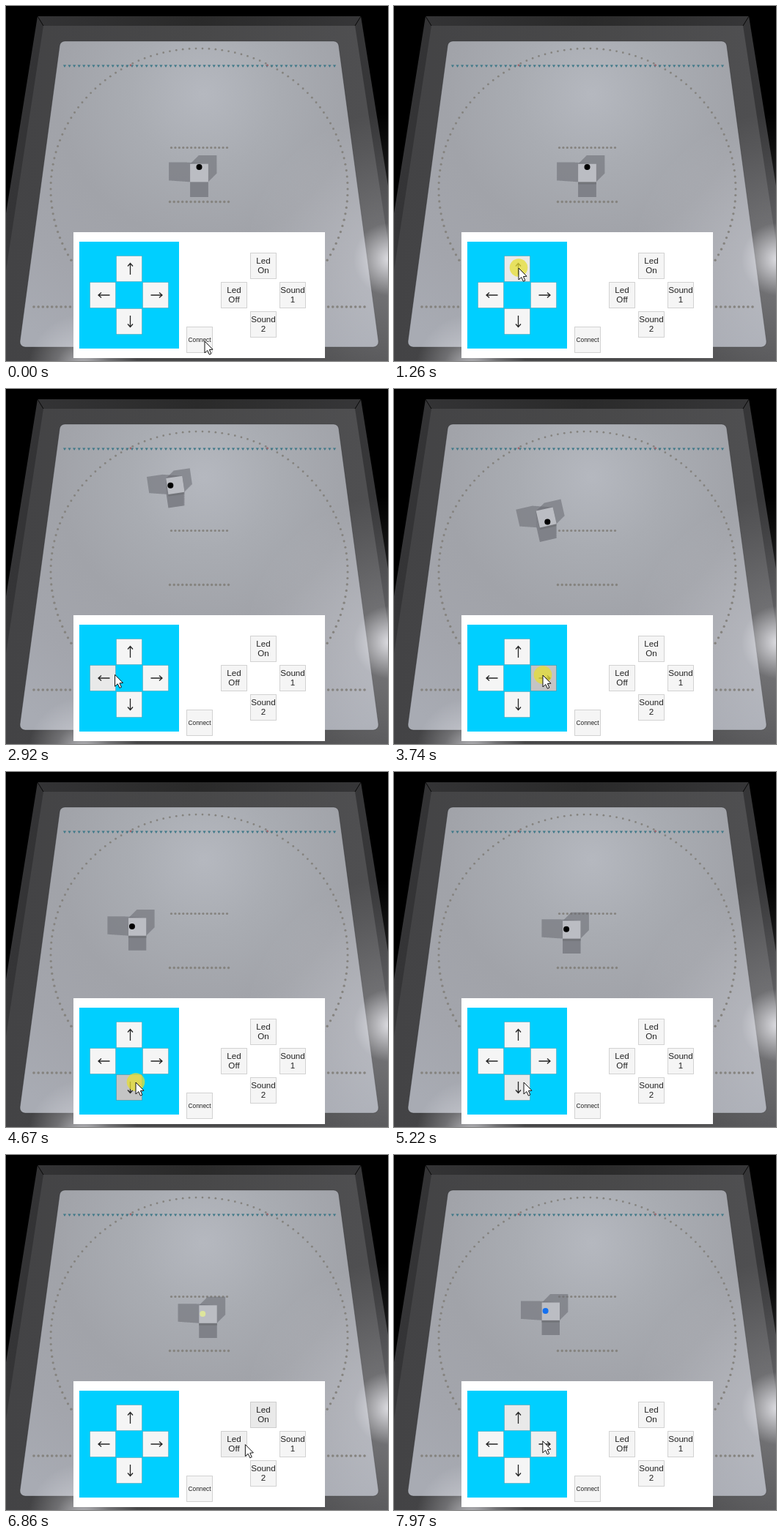
Animation, 521 px wide and 485 px high, one loop 8 s. Source, as an HTML page with a canvas:

```html
<!DOCTYPE html>
<html lang="en">
<head>
<meta charset="utf-8">
<title>Robot remote</title>
<style>
html, body { margin: 0; width: 100%; height: 100%; overflow: hidden; background: #000; }
canvas { display: block; }
</style>
</head>
<body>
<canvas id="stage" width="521" height="485"></canvas>
<script>
const ctx = document.getElementById('stage').getContext('2d');
const LOOP = 8000, SIDE = 35, DOT = '#85837f';

// centre and label; arrow buttons carry quarter turns instead
const buttons = { connect: { x: 264, y: 456, label: ['Connect'] } };
function addCross(cx, cy, pitch, items) {
  items.forEach(([name, content], i) => {
    const a = i * Math.PI / 2;
    buttons[name] = {
      x: cx + Math.round(pitch * Math.sin(a)), y: cy - Math.round(pitch * Math.cos(a)),
      label: content, turns: i
    };
  });
}
addCross(168, 395, 36, [['up'], ['right'], ['down'], ['left']]);
addCross(351, 395, 40, [['ledOn', ['Led', 'On']], ['sound1', ['Sound', '1']],
  ['sound2', ['Sound', '2']], ['ledOff', ['Led', 'Off']]]);

// each click: time, button, pointer offset from the button's centre
const clicks = [
  [0, 'connect', 7, 2], [1250, 'up', 2, -1], [2070, 'left', -4, -5], [3640, 'right', -1, -4],
  [4590, 'down', 9, -7], [6190, 'ledOn', 12, 0], [6990, 'ledOff', 15, 1], [7380, 'up', 2, -1],
  [8050, 'right', -1, -4]
].map(([t, name, dx, dy]) => ({ t, name, x: buttons[name].x + dx, y: buttons[name].y + dy }));

const lerp = (a, b, p) => a + (b - a) * p;
const span = (t, a, b) => Math.min(1, Math.max(0, (t - a) / (b - a)));
const easeOut = p => 1 - (1 - p) ** 3;

function poly(points, fill, stroke) {
  ctx.beginPath();
  points.forEach(([x, y]) => ctx.lineTo(x, y));
  ctx.closePath();
  ctx.fillStyle = fill;
  ctx.fill();
  if (stroke) { ctx.strokeStyle = stroke; ctx.stroke(); }
}

function dot(x, y, r, fill) {
  ctx.beginPath();
  ctx.arc(x, y, r, 0, 7);
  ctx.fillStyle = fill;
  ctx.fill();
}

function withStops(g, colors) {
  colors.forEach((c, i) => g.addColorStop(i / (colors.length - 1), c));
  return g;
}
const linear = (x, y, ...colors) => withStops(ctx.createLinearGradient(0, 0, x, y), colors);
const radial = (x, y, r, ...colors) => withStops(ctx.createRadialGradient(x, y, 0, x, y, r), colors);

function glow(x, y, r, ...alphas) {
  ctx.fillStyle = radial(x, y, r, ...alphas.map(a => `rgba(240,240,245,${a})`));
  ctx.fillRect(x - r, y - r, 2 * r, 2 * r);
}

function dotRow(x0, x1, y, n, r) {
  for (let i = 0; i < n; i++) dot(lerp(x0, x1, i / (n - 1)), y, r, DOT);
}

// all side edges run towards one vanishing point
function slab(half, top, bottom) {
  const cx = 263.5, far = half * (bottom + 1366) / (top + 1366);
  return [[cx - half, top], [cx + half, top], [cx + far, bottom], [cx - far, bottom]];
}

function drawMat() {
  const corners = slab(189.5, 48, 466);
  ctx.beginPath();
  ctx.moveTo(263, 48);
  for (let i = 1; i <= 4; i++) ctx.arcTo(...corners[i % 4], ...(i < 4 ? corners[(i + 1) % 4] : [263, 48]), 7);
  ctx.closePath();
  ctx.fillStyle = radial(270, 120, 400, '#b5b8bf', '#a9acb2', '#a1a3a9', '#a3a5ac', '#a8abb3');
  ctx.fill();
  ctx.strokeStyle = 'rgba(30,30,32,.35)';
  ctx.stroke();
}

function drawArena() {
  ctx.fillStyle = '#000';
  ctx.fillRect(0, 0, 521, 485);
  ctx.lineWidth = 1;
  const rim = slab(220.5, 14, 485), floor = slab(212.5, 27, 485);
  poly(rim, linear(521, 0, '#353537', '#2a2a2a', '#38383a'));
  poly(floor, linear(521, 0, '#434345', '#484849', '#505052'));
  ctx.strokeStyle = '#090909';
  ctx.beginPath();
  for (let i = 0; i < 2; i++) {
    ctx.moveTo(...rim[i]);
    ctx.lineTo(...floor[i]);
  }
  ctx.stroke();
  drawMat();
  glow(524, 346, 200, .9, .2, .13, .06, 0);
  glow(105, 496, 75, .7, .25, 0);

  const n = 142;
  for (let i = 0; i < n; i++) {
    const a = (i + .5) / n * Math.PI * 2, y = 250 - 192 * Math.cos(a);
    dot(263.5 + 202.5 * Math.sin(a), y, 1.3 + y / 900, DOT);
  }
  for (let i = 0; i < 57; i++) {
    const x = lerp(80, 448, i / 56);
    poly([[x - 2.1, 80.5], [x + 2.1, 80.5], [x, 84]], '#3f7888');
  }
  dot(170, 81, 1.4, '#a0656c');
  dot(356.5, 81, 1.4, '#a0656c');
  dotRow(225.5, 301.5, 193.5, 15, 1.6);
  dotRow(223.5, 303.5, 267.5, 15, 1.7);
  dotRow(38, 489, 411, 74, 1.8);
}

// x, y and heading in radians, counterclockwise from up
function pose(t) {
  const side = Math.PI / 2, far = 194 * Math.PI / 180;
  if (t < 2100) return [263.5, lerp(228, 158.5, span(t, 1270, 2090)), 0];
  if (t < 3730) {
    const p = span(t, 2100, 3720), a = far * p;
    return [235 + 28.5 * Math.cos(a), 158.5 - 28.5 * Math.sin(a) + 8 * p ** 3, a];
  }
  if (t < 4670) {
    const a = lerp(far, side, span(t, 3730, 4670));
    return [179 - 29.5 * Math.cos(a), 182 + 29.5 * Math.sin(a), a];
  }
  const p = span(t, 4670, 5510) - .65 * span(t, 7430, 7980);
  return [lerp(179, 275.5, p), lerp(211.5, 217.5, p), side];
}

function drawRobot(t) {
  const [x, y, a] = pose(t), cos = Math.cos(a), sin = Math.sin(a);
  const s = 1 + (y - 228) * .001, h = 12.4 * s;
  const corners = [[-h, -h], [h, -h], [h, h], [-h, h]].map(([u, v]) => [x + u * cos + v * sin, y - u * sin + v * cos]);

  // square dragged along a vector
  const sweep = (dx, dy, fill) => {
    ctx.beginPath();
    for (let i = 0; i <= 30; i++) {
      corners.forEach(([u, v], k) => ctx[k ? 'lineTo' : 'moveTo'](u + dx * s * i / 30, v + dy * s * i / 30));
      ctx.closePath();
    }
    ctx.fillStyle = fill;
    ctx.fill();
  };
  sweep(-29, -2, 'rgba(105,107,115,.56)');
  sweep(11.5, -11.5, 'rgba(105,107,115,.56)');
  sweep(0, 20.5, '#7f8188');
  if (t > 700) sweep(0, 3, '#73757a');
  poly(corners, '#bbbdc3');
  const led = t > 7060 ? '#1470f0' : t > 6260 ? '#dde59c' : '#000';
  dot(x - sin * 7.3 * s, y - cos * 7.3 * s - .6, 4, led);
}

function pointerAt(t) {
  const i = clicks.findIndex(c => c.t > t), from = clicks[i - 1], to = clicks[i];
  const p = easeOut(span(t, Math.max(from.t + 200, to.t - 800), to.t));
  return [lerp(from.x, to.x, p), lerp(from.y, to.y, p)];
}

function drawArrow(x, y, turns) {
  ctx.save();
  ctx.translate(x + 1.5, y);
  ctx.rotate(turns * Math.PI / 2);
  ctx.beginPath();
  ctx.moveTo(0, 8);
  ctx.lineTo(0, -7.5);
  ctx.moveTo(-3.5, -3.5);
  ctx.lineTo(0, -7.5);
  ctx.lineTo(3.5, -3.5);
  ctx.strokeStyle = '#262626';
  ctx.lineWidth = 1.3;
  ctx.stroke();
  ctx.restore();
}

function drawButton({ x, y, label, turns }, isLast, held, hover) {
  const box = [x - SIDE / 2, y - SIDE / 2, SIDE, SIDE];
  ctx.fillStyle = isLast && held ? '#c4c4c4' : isLast ? '#e9e9e9' : hover ? '#efefef' : '#f5f5f5';
  ctx.fillRect(...box);
  ctx.strokeStyle = 'rgba(0,0,0,.16)';
  ctx.lineWidth = 1;
  ctx.strokeRect(...box);
  if (!label) return drawArrow(x, y, turns);

  const size = label.length > 1 ? 11.6 : 8.3;
  ctx.font = size + 'px "Liberation Sans", Arial, sans-serif';
  ctx.fillStyle = '#222';
  label.forEach((line, i) => {
    const mid = y + (i - (label.length - 1) / 2) * 13;
    ctx.fillText(line, x, Math.round(mid + size * .33));
  });
}

function drawPanel(t) {
  const [mx, my] = pointerAt(t);
  const last = clicks.filter(c => c.t && c.t <= t).pop();
  const age = last ? t - last.t : LOOP;
  ctx.fillStyle = '#fff';
  ctx.fillRect(92, 309, 343, 172);
  ctx.fillStyle = '#00cfff';
  ctx.fillRect(100, 322, 136, 146);
  ctx.textAlign = 'center';
  for (const name in buttons) {
    const b = buttons[name];
    const hover = t > 450 && Math.max(Math.abs(mx - b.x), Math.abs(my - b.y)) < SIDE / 2;
    drawButton(b, last && last.name === name, age > 40 && age < 260, hover);
  }
  if (age < 260) dot(mx, my - .5, 12.3, 'rgba(230,222,50,.75)');
  poly([[0, 0], [0, 16], [3.8, 12.6], [6.4, 18.2], [8.9, 17], [6.4, 11.6], [11, 11.2]]
    .map(([x, y]) => [mx + x, my + y]), '#fff', '#111');
}

function frame(now) {
  const t = now % LOOP;
  drawArena();
  drawRobot(t);
  drawPanel(t);
  requestAnimationFrame(frame);
}
requestAnimationFrame(frame);
</script>
</body>
</html>
```
